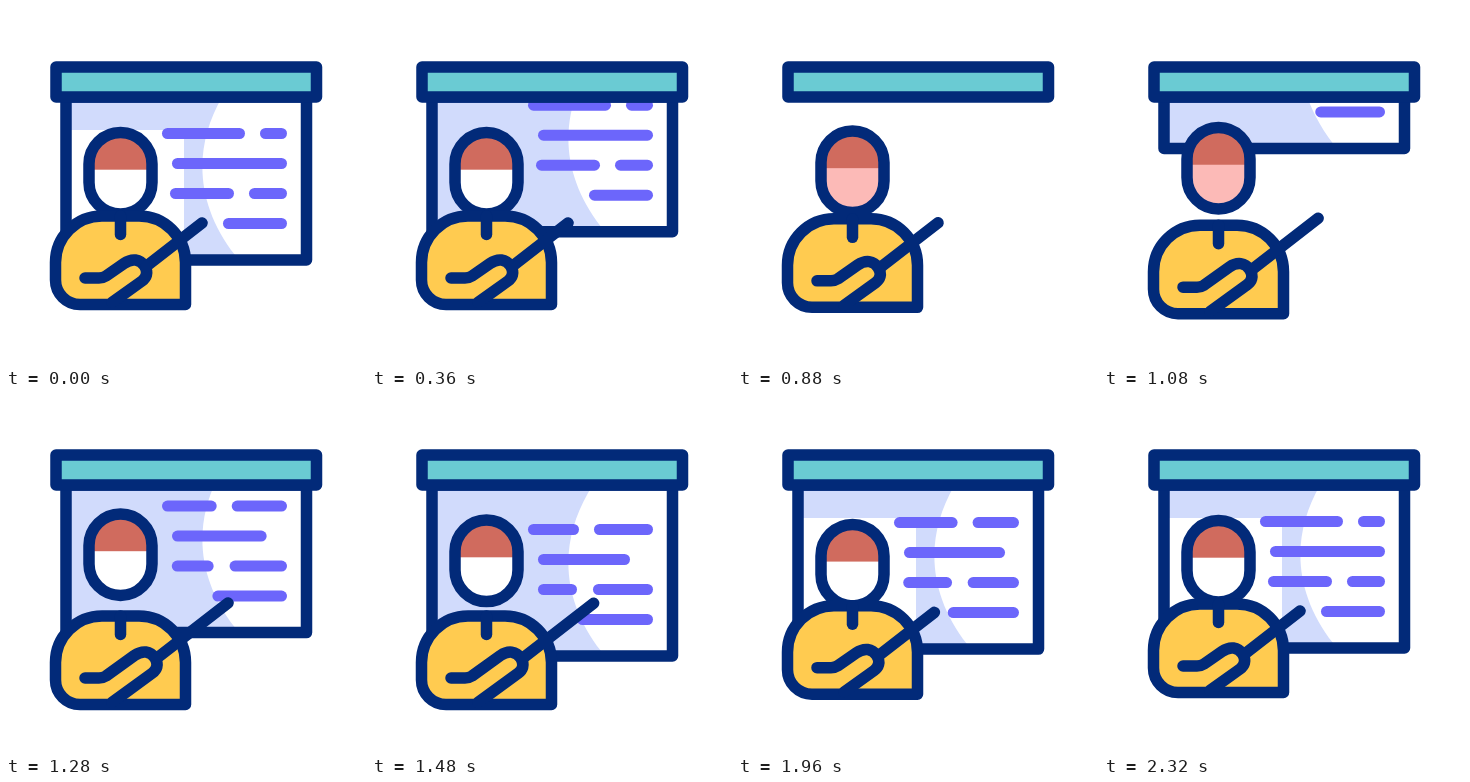
Animation, 360 px wide and 360 px high, one loop 2600 ms. Source, as an HTML page with a canvas:

```html
<!DOCTYPE html>
<html lang="en">
<head>
<meta charset="utf-8">
<title>Presenter</title>
<style>
  html, body { margin: 0; width: 100%; height: 100%; overflow: hidden; background: #fff; }
  canvas { display: block; width: 360px; height: 360px; }
</style>
</head>
<body>
<canvas id="stage"></canvas>
<script>
const LOOP = 2600, STEP = 40, LINE = 11.5;
const NAVY = '#022a79', TEAL = '#6acbd3', PALE = '#d1dbfc', VIOLET = '#6c66fb';
const YELLOW = '#ffcb50', HAIR = '#d06b5e', SKIN = '#fcbab7', WHITE = '#fff';

const canvas = document.getElementById('stage');
const ctx = canvas.getContext('2d');
const ratio = window.devicePixelRatio || 1;
canvas.width = canvas.height = 360 * ratio;

// Smooth progress from 0 to 1 between two times.
function ease(t, from, to) {
  const s = Math.min(1, Math.max(0, (t - from) / (to - from)));
  return s * s * (3 - 2 * s);
}

function poseAt(t) {
  const settle = ease(t, 1545, 2085);
  return {
    board: -163 * ease(t, 165, 900) + 171 * ease(t, 900, 1395) - 8 * settle,
    words: ease(t, 760, 1420) - ease(t, 1720, 2280),
    body: 12 * (ease(t, 710, 1250) - settle),
    head: -6.5 * ease(t, 710, 1250) + 15.5 * ease(t, 1300, 1720) - 9 * ease(t, 1720, 2160),
    reach: ease(t, 750, 1270) - ease(t, 1440, 2000),
    faceFilled: t >= 480 && t < 1160,
    tintFilled: t >= 200 && t < 1500
  };
}

function pen(color, width) {
  ctx.strokeStyle = color;
  ctx.lineWidth = width;
  ctx.lineCap = ctx.lineJoin = 'round';
}

function segment(x0, y0, x1, y1) {
  ctx.beginPath();
  ctx.moveTo(x0, y0);
  ctx.lineTo(x1, y1);
  ctx.stroke();
}

function fillBox(color, x, y, w, h) {
  ctx.fillStyle = color;
  ctx.fillRect(x, y, w, h);
}

// Draws at a vertical offset and restores the state afterwards.
function shifted(dy, paint) {
  ctx.save();
  ctx.translate(0, dy);
  paint();
  ctx.restore();
}

function drawWords(u) {
  pen(VIOLET, 11);
  const dash = (row, left, right) => {
    const y = 127.5 + 30 * row;
    segment(left + 5.5, y, right - 5.5, y);
  };
  dash(0, 156, 239 - 32 * u);
  dash(0, 254 - 32 * u, 281);
  dash(1, 166, 281 - 23 * u);
  dash(2, 164 + 2 * u, 228 - 23 * u);
  dash(2, 243 - 22 * u, 281);
  dash(3, 217 - 12 * u, 281);
}

function drawTint() {
  ctx.beginPath();
  ctx.moveTo(60, 70);
  ctx.lineTo(229, 70);
  ctx.lineTo(216, 91);
  ctx.bezierCurveTo(188, 140, 188, 196, 229, 249);
  ctx.lineTo(60, 260);
  ctx.fillStyle = PALE;
  ctx.fill();
}

function drawBoard(pose) {
  const bottom = 254 + pose.board;
  pen(NAVY, LINE);
  if (bottom > 92) {
    ctx.save();
    ctx.beginPath();
    ctx.rect(60, 85, 240, bottom - 85);
    ctx.clip();
    shifted(pose.board, drawTint);
    if (!pose.tintFilled) fillBox(WHITE, 60, 124, 118, 140);
    shifted(pose.board, () => drawWords(pose.words));
    ctx.restore();
    ctx.strokeRect(60, 91, 240.5, bottom - 91);
  }
  fillBox(TEAL, 50, 61, 260.5, 30);
  ctx.strokeRect(50, 61, 260.5, 30);
}

function drawHead(skin) {
  ctx.beginPath();
  ctx.roundRect(83, 126.5, 63, 81.5, 31.5);
  ctx.save();
  ctx.clip();
  fillBox(skin, 80, 120, 70, 90);
  fillBox(HAIR, 80, 120, 70, 43.7);
  ctx.restore();
  pen(NAVY, LINE);
  ctx.stroke();
}

function drawTorso() {
  const left = 49.5, right = 179.5, top = 210, bottom = 298.5;
  ctx.beginPath();
  ctx.moveTo(right, bottom);
  ctx.arcTo(left, bottom, left, top, 24.5);
  ctx.arcTo(left, top, right, top, 46.5);
  ctx.arcTo(right, top, right, bottom, 46.5);
  ctx.closePath();
  ctx.fillStyle = YELLOW;
  ctx.fill();
  pen(NAVY, LINE);
  ctx.stroke();
  segment(114.5, top, 114.5, 228.5);
}

// The hand follows part of the pointer's travel.
function drawArm(reach) {
  const hx = 10.4 * reach, hy = -8 * reach;
  ctx.beginPath();
  ctx.moveTo(79, 272);
  ctx.lineTo(93, 272);
  ctx.quadraticCurveTo(97, 272, 100, 270);
  ctx.lineTo(118 + hx, 257.5 + hy);
  ctx.bezierCurveTo(126 + hx, 252 + hy, 134 + hx, 253 + hy, 138.5 + hx, 260 + hy);
  ctx.bezierCurveTo(143 + hx, 267 + hy, 140 + hx, 272 + hy, 136 + hx, 275 + hy);
  ctx.lineTo(106, 296.5);
  ctx.stroke();
  segment(140 + hx, 260.5 + hy, 196 + 26 * reach, 217 - 20 * reach);
}

function draw(t) {
  const pose = poseAt(t);
  ctx.setTransform(ratio, 0, 0, ratio, 0, 0);
  fillBox(WHITE, 0, 0, 360, 360);
  drawBoard(pose);
  shifted(pose.head, () => drawHead(pose.faceFilled ? SKIN : WHITE));
  shifted(pose.body, () => {
    drawTorso();
    drawArm(pose.reach);
  });
}

const start = performance.now();
function tick() {
  const t = (performance.now() - start) % LOOP;
  draw(Math.floor(t / STEP) * STEP);
  requestAnimationFrame(tick);
}
tick();
</script>
</body>
</html>
```
